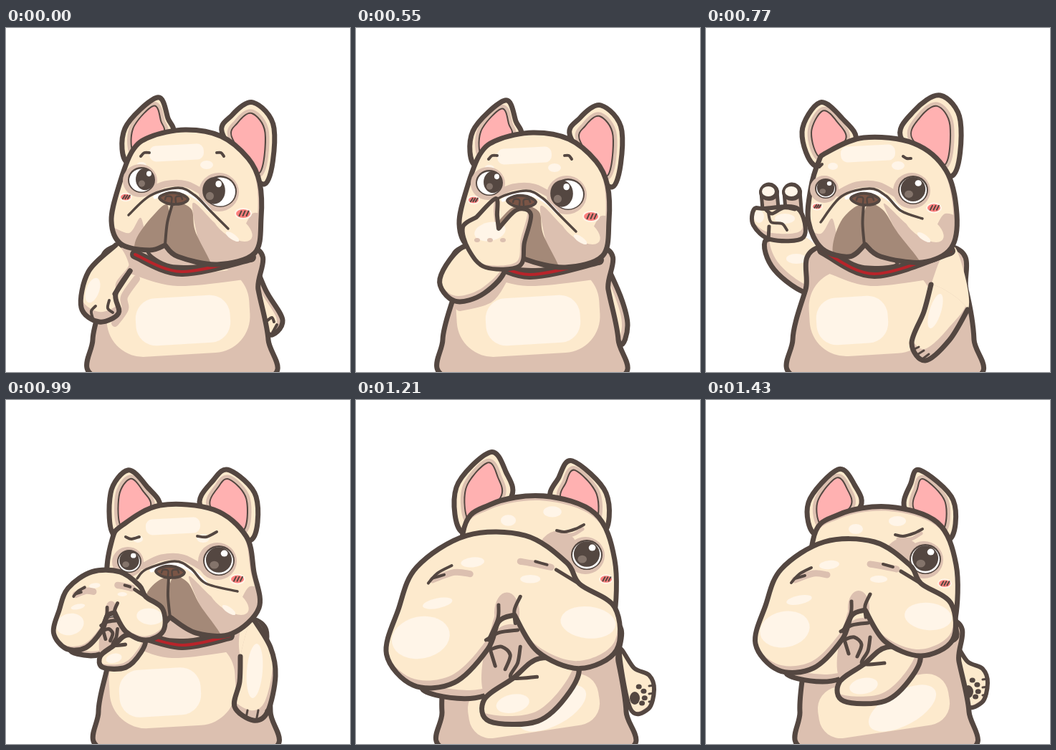
Write an HTML page with a canvas that moves like this. It is 480 px wide and 480 px high and loops after 1.98 s.

```html
<!DOCTYPE html>
<html lang="en">
<head>
<meta charset="utf-8">
<title>Puppy punch</title>
<style>
html, body { margin: 0; height: 100%; overflow: hidden; background: #fff; }
canvas { display: block; width: 100vw; height: 100vh; }
</style>
</head>
<body>
<canvas width="480" height="480"></canvas>
<script>
const ctx = document.querySelector('canvas').getContext('2d');
const INK = '#544741', CREAM = '#fdeacd', TAN = '#dcc0b0', LIGHT = '#fff5e8',
  BROWN = '#a48978', PINK = '#ffb1b1', RED = '#b8242a', WHITE = '#fff';
let pen = 1; // keeps line weight steady inside scaled groups

const nums = s => typeof s === 'string' ? s.split(' ').map(Number) : s;
const mix = (a, b, k) => nums(a).map((v, i) => v + (nums(b)[i] - v) * k);

// Smooth curve through "x y x y ..."; a repeated point makes a corner.
function curve(s, closed = true) {
  const n = nums(s), len = n.length / 2, path = new Path2D();
  const get = i => {
    i = closed ? (i + len) % len : Math.max(0, Math.min(len - 1, i));
    return [n[2 * i], n[2 * i + 1]];
  };
  path.moveTo(...get(0));
  for (let i = 0; i < len - !closed; i++) {
    const [a, b, c, d] = [-1, 0, 1, 2].map(k => get(i + k));
    if (b[0] === c[0] && b[1] === c[1]) continue;
    path.bezierCurveTo(b[0] + (c[0] - a[0]) / 6, b[1] + (c[1] - a[1]) / 6,
      c[0] - (d[0] - b[0]) / 6, c[1] - (d[1] - b[1]) / 6, ...c);
  }
  if (closed) path.closePath();
  return path;
}

function put(s, color) {
  ctx.fillStyle = color;
  ctx.fill(curve(s));
}

function line(s, w = 4, color = INK, closed = false) {
  ctx.strokeStyle = color;
  ctx.lineWidth = w * pen;
  ctx.stroke(curve(s, closed));
}

function oval(x, y, rx, ry, color, turn = 0) {
  ctx.fillStyle = color;
  ctx.beginPath();
  ctx.ellipse(x, y, rx, ry, turn, 0, 7);
  ctx.fill();
}

// Rounded box, softer than an oval
function pillow(x, y, rx, ry, color, turn = 0) {
  at(x, y, 1, 1, () => {
    ctx.rotate(turn);
    ctx.fillStyle = color;
    ctx.beginPath();
    ctx.roundRect(-rx, -ry, 2 * rx, 2 * ry, ry * .85);
    ctx.fill();
  });
}

function at(x, y, sx, sy, draw) {
  const old = pen;
  pen /= Math.sqrt(sx * sy);
  ctx.save();
  ctx.translate(x, y);
  ctx.scale(sx, sy);
  draw();
  ctx.restore();
  pen = old;
}

// Outlined shape: shadow below, the same shape moved by (dx, dy) as the lit part.
function form(s, dx, dy, details, w = 7, closed = true) {
  put(s, TAN);
  ctx.save();
  ctx.clip(curve(s));
  at(dx, dy, 1, 1, () => put(s, CREAM));
  if (details) details();
  ctx.restore();
  line(s, w, INK, closed);
}

const limb = (s, dx, dy, details) => form(s, dx, dy, details, 7, false);

function ear(s) {
  form(s, 0, 0, () => {
    const n = nums(s), mid = k => {
      const v = n.filter((_, i) => i % 2 === k);
      return (Math.min(...v) + Math.max(...v)) / 2;
    };
    const c = [mid(0), mid(1)], scale = [.62, .72];
    const inner = n.map((v, i) => c[i % 2] + (v - c[i % 2]) * scale[i % 2]);
    line(inner, 13, TAN, true);
    line(inner, 4, INK, true);
    put(inner, PINK);
  });
}

// The pupil looks sideways by dx.
function eye(x, y, r, dx = 0) {
  const px = x + dx, py = y - 1, rx = r * (dx ? .72 : .86), ry = r * .85;
  oval(x - 2, y + 1, r + 6, r + 5, TAN);
  oval(x, y, r + 1, r, INK);
  oval(x, y + .5, r - 1, r - 2, WHITE);
  oval(px, py, rx, ry, INK);
  oval(px - rx * .35, py + ry * .4, rx * .35, ry * .3, '#84746b');
  oval(px + rx * .42, py - ry * .5, rx * .27, ry * .25, WHITE);
}

function blush(x, y, r) {
  oval(x, y, r + 2, r * .6 + 2, LIGHT);
  oval(x, y, r, r * .6, '#ff7f7d');
  for (const d of [-.45, .05, .55])
    line([x + r * d - 1, y + r * .3, x + r * d + 2, y - r * .35], 2);
}

function nose() {
  put('-20 -1 -10 -7 2 -8 13 -5 20 1 11 7 -8 7', '#7a5546');
  line('-20 -1 -10 -7 2 -8 13 -5 20 1 11 7 -8 7', 4, INK, true);
  for (const side of [-1, 1]) line([side * 3, 5, side * 3, -2, side * 10, -3, side * 12, 1], 2.5);
}

// Head built around the nose; lean moves the mouth, jaw gives the reach of both jowls.
function head({ ears, skull, nose: [x, y], lean, jaw: [l, r], crease: [lx, ly, rx, ry],
  collar, eyes, brows, cheeks }) {
  ears.forEach(ear);
  line(collar, 14);
  line(collar, 4, RED);
  at(x, y, 1, 1, () => form([-36, 74, lean, 60, 45, 90, -5, 94], 0, -50, null, 5));
  form(skull, -5, -3, () => at(x, y, 1, 1, () => {
    put([26, 8, 60, 36, 90, 50, 112, 20, 140, 40, 120, 95, r, 100], TAN);
    oval(82, 38, 32, 15, CREAM, .6);
    oval(82, 53, 11, 4, LIGHT, .6);
    put('-45 28 -62 48 -90 42 -80 90 -40 90', TAN);
    put([lean / 2 - 2, 10, -29, 24, l, 58, l + 4, 80, lean, 66], BROWN);
    put([lean / 3 + 2, 10, 24, 14, r * .57, 46, r, 95, 30, 90, lean, 63], BROWN);
    pillow(4, -64, 38, 11, LIGHT, -.05);
    oval(-45, -46, 7, 5, LIGHT);
    oval(46, -47, 9, 6, LIGHT);
    line('-38 -8 -12 -20 18 -20 48 -4', 9, TAN);
  }));
  eyes.forEach(e => eye(...e));
  at(x, y, 1, 1, () => {
    line('-26 -2 -8 -10 16 -9 36 2 50 16', 5, WHITE);
    line([lx, ly, -33, -4, 6, -15, 29, -5, 50, 16, rx, ry], 3.5);
    line([-2, 8, lean / 2 - 3, 34, lean, 64]);
    nose();
  });
  brows.forEach(b => line(b));
  cheeks.forEach(c => blush(...c));
}

// Shoulder, waist and hip on the left, then on the right
function body([s1, w1, h1, s2, w2, h2], lit) {
  const s = [s1, 305, w1, 365, h1, 435, h1 + 14, 490, h2 - 6, 490, h2, 435, w2, 365, s2, 305];
  form(s, 0, -200, lit);
}

function belly(x, rx, hx, hrx) {
  return () => {
    pillow(x, 396, rx, 60, CREAM, -.06);
    line([x - rx * .65, 335, x, 352, x + rx, 342], 16, TAN);
    pillow(hx, 408, hrx, 33, LIGHT, -.06);
  };
}

const aside = {
  ears: ['171 188 166 140 211 97 226 126 230 150', '303 150 315 122 345 104 374 140 360 218'],
  skull: '176 172 201 152 250 142 300 151 338 182 354 216 356 265 347 314 295 330 240 319 222 303 222 303 200 310 160 301 147 269 157 222',
  nose: [234, 238], lean: -12, jaw: [-53, 53], crease: [-63, 23, 76, 42],
  collar: '180 316 245 340 342 320',
  eyes: [[189, 212, 18, 5], [299, 228, 22, -9]],
  brows: ['188 179 193 174 200 174', '294 174 300 174 304 179'],
  cheeks: [[167, 236, 7], [331, 259, 10]]
};

const facing = {
  ears: ['155 193 134 145 159 104 190 126 208 158', '273 155 290 116 327 94 355 130 342 207'],
  skull: '168 174 220 153 290 161 335 199 350 260 342 307 302 327 244 319 222 302 222 302 200 319 162 308 143 270 146 225 157 187',
  nose: [222, 239], lean: -1, jaw: [-44, 79], crease: [-62, 32, 80, 27],
  collar: '162 310 235 343 341 311',
  eyes: [[167, 224, 14], [289, 226, 20]],
  brows: ['158 194 162 190', '275 179 280 182 286 182'],
  cheeks: [[155, 249, 6], [318, 251, 9]]
};

const frowning = {
  ears: ['153 190 146 130 170 98 196 120 213 152', '272 150 290 111 312 98 349 135 340 196'],
  skull: '162 175 215 147 290 153 335 190 346 240 353 290 315 326 265 325 229 303 229 303 205 320 158 305 141 248 148 195',
  nose: [229, 240], lean: 0, jaw: [-39, 73], crease: [-46, 9, 94, 27],
  collar: '180 325 245 342 312 329',
  eyes: [[172, 225, 16], [297, 224, 21]],
  brows: ['167 191 175 194 186 191', '267 190 280 191 294 184'],
  cheeks: [[323, 250, 9]]
};

const sideBody = () => body([152, 139, 121, 342, 352, 366], belly(240, 100, 247, 66));

function resting() {
  limb('340 310 362 365 386 408 366 427 347 375', -8, 0);
  line('365 408 371 404 374 410');
  line('372 425 378 414');
  sideBody();
  line('182 350 165 375 166 392 152 412', 10, TAN);
  limb('153 303 115 340 105 390 130 410 157 398 153 371 173 339', 0, -14,
    () => oval(121, 366, 9, 18, LIGHT, .35));
  line('173 339 152 371', 7);
  line('125 388 119 395 121 405');
  line('144 380 142 391 149 397');
}

// Hand to the nose; forearm, hand, and the place of the palm
function raised(dx, dy, arm, hand, [x, y], hx = 0, hy = 0) {
  limb('340 310 369 374 379 415 368 440 345 370', -8, 0);
  sideBody();
  line('145 388 185 377 204 351', 14, TAN);
  at(dx, dy, 1, 1, () => head(aside));
  at(hx, hy, 1, 1, () => {
    form(arm, -2, -8);
    form(hand, -5, -5, () => {
      oval(x, y, 22, 13, LIGHT, -.2);
      for (const d of [-18, 0, 18]) oval(x + d, y + 12, 4, 3, TAN);
    }, 6);
  });
}

const lowHand = ['134 323 117 359 147 385 185 362 195 340',
  '134 322 140 304 153 306 153 306 169 284 173 306 180 317 180 317 207 299 207 322 200 331 201 357 166 354 138 341', [172, 322]];
const highHand = ['154 304 117 350 138 381 179 370 207 333',
  '157 309 149 278 168 264 168 264 195 238 197 262 199 280 199 280 224 254 244 260 235 299 228 332 181 334', [187, 284]];

function peaceHand() {
  for (const x of [88, 120]) {
    const finger = [x, 229, x + 3, 264];
    line(finger, 27);
    line(finger, 17, TAN);
    oval(x, 229, 14, 12, INK);
    oval(x - 1, 228, 9, 7, LIGHT);
  }
  form('82 252 128 252 136 292 90 295 66 275 67 253', -3, -10, () => {
    oval(110, 266, 14, 7, LIGHT);
    oval(74, 263, 7, 9, LIGHT);
  }, 6);
  line('82 252 92 259 108 251 124 253', 5);
  line('87 258 91 271 106 273 113 282');
  line('88 277 87 296', 5);
}

function peace(dx, dy, hx, hy) {
  at(hx, hy, 1, 1, () => limb('135 290 84 295 95 337 145 370 175 335', 7, -8,
    () => oval(126, 322, 14, 7, LIGHT)));
  body([160, 139, 121, 343, 363, 374], belly(230, 86, 204, 50));
  put('314 358 300 400 365 395 350 310 330 318', CREAM);
  limb('314 358 304 396 287 440 306 464 340 435 365 393', -2, -16,
    () => oval(320, 395, 8, 25, LIGHT, .3));
  for (const i of [0, 1, 2]) line([289 + 7 * i, 449 + 6 * i, 297 + 7 * i, 445 + 5 * i], 3);
  at(dx, dy, 1, 1, () => head(facing));
  at(hx, hy, 1, 1, peaceHand);
}

function fist() {
  form('112 377 162 393 205 378 205 330', 3, -10);
  put('190 325 225 305 275 350 250 380 188 390', TAN);
  form('220 369 186 394 192 420 250 420 288 385 297 353 252 345', -6, -10,
    () => oval(220, 399, 20, 11, LIGHT, -.2));
  form('83 287 105 236 165 198 235 198 284 230 300 256 342 284 344 335 300 357 250 337 222 293 222 293 203 301 190 334 150 374 101 377 69 340', -3, -9, () => {
    oval(213, 290, 15, 24, TAN);
    oval(110, 320, 35, 25, LIGHT, -.2);
    oval(310, 302, 33, 19, LIGHT, .1);
    oval(172, 230, 14, 6, LIGHT, -.1);
    oval(241, 250, 12, 5, LIGHT);
    oval(130, 279, 18, 6, LIGHT, -.2);
    line('124 251 150 242 169 244', 9, TAN);
    line('229 229 247 232 266 236', 9, TAN);
  });
  line('119 255 130 243 147 234');
  line('124 249 138 245');
  line('247 229 261 233');
  line('272 239 300 256', 5);
  line('203 281 202 298 191 323', 5);
  line('229 271 222 287 223 303', 5);
  line('188 323 204 314 226 311', 5);
  line('192 331 199 354', 5);
  line('194 334 207 331 217 341 211 358', 5);
  line('229 331 226 350 218 368 249 367', 5);
}

function frown(...place) {
  body([150, 143, 129, 343, 362, 369], belly(232, 88, 215, 57));
  put('327 358 350 400 371 370 345 310 328 318', CREAM);
  limb('327 358 326 393 319 428 345 447 365 435 376 385 369 345 345 305', -4, -14,
    () => oval(347, 378, 11, 38, LIGHT, .08));
  for (const x of [335, 350, 361]) line([x, 443, x + 2, 433], 3);
  head(frowning);
  at(...place, fist);
}

function paw() {
  form('345 340 365 365 386 375 393 395 385 422 360 422', -2, -3, () => {
    oval(366, 407, 7, 9, INK);
    for (const a of [-1.2, -.5, .2, .8])
      oval(367 + 13 * Math.cos(a), 404 + 14 * Math.sin(a), 4, 3.5, INK);
    for (const y of [390, 401, 412]) line([386, y, 394, y - 1], 3);
  }, 6);
}

// k grows the pose towards the viewer.
function punch(k, ...place) {
  at(23 * k, 9 * k, 1, 1, paw);
  body(mix([150, 138, 131, 340, 353, 367], [138, 125, 120, 350, 366, 377], k), () => {
    pillow(248, 427, 92, 36, CREAM, -.15);
    oval(274, 430, 52, 24, LIGHT, -.5);
  });
  ear(mix('155 188 143 143 184 97 207 118 214 151', '150 185 140 122 187 73 209 100 215 138', k));
  ear(mix('279 155 286 116 299 98 345 140 338 195', '274 142 283 108 302 85 349 130 343 185', k));
  at(-9 * k, -30 * k, 1 + .06 * k, 1 + .1 * k, () =>
    form('149 197 185 160 255 149 323 171 349 230 348 305 330 340 150 340', 0, 6, () => {
      oval(275, 225, 28, 32, TAN);
      oval(209, 180, 10, 7, LIGHT);
      oval(267, 169, 12, 7, LIGHT);
    }));
  at(16 * k, -6 * k, 1, 1, () => {
    line('268 194 286 194 300 186', 5, TAN);
    eye(306, 222, 21);
    line('264 188 275 190 290 186 302 180');
    blush(333, 256, 8);
  });
  at(...place, fist);
}

const steps = [
  () => { resting(); head(aside); },
  () => raised(-6, 8, ...lowHand),
  () => raised(-5, 6, ...highHand, -3, 12),
  () => raised(-3, 4, ...highHand),
  () => peace(4, 3, 14, 6),
  () => peace(0, 0, 0, 0),
  () => frown(40, 150, .45, .5),
  () => frown(28, 121, .557, .6),
  () => punch(.3, -5, 40, .87, .87),
  () => punch(1, -38, -42, 1.167, 1.167),
  () => punch(.45, -17, -19, 1.075, 1.075),
  () => punch(0, 0, 0, 1, 1)
];

ctx.lineCap = ctx.lineJoin = 'round';

function frame(now) {
  const t = now % 1980;
  const step = Math.max(0, Math.min(11, Math.floor((t - 220) / 110)));
  ctx.clearRect(0, 0, 480, 480);
  steps[step]();
  requestAnimationFrame(frame);
}
requestAnimationFrame(frame);
</script>
</body>
</html>
```
